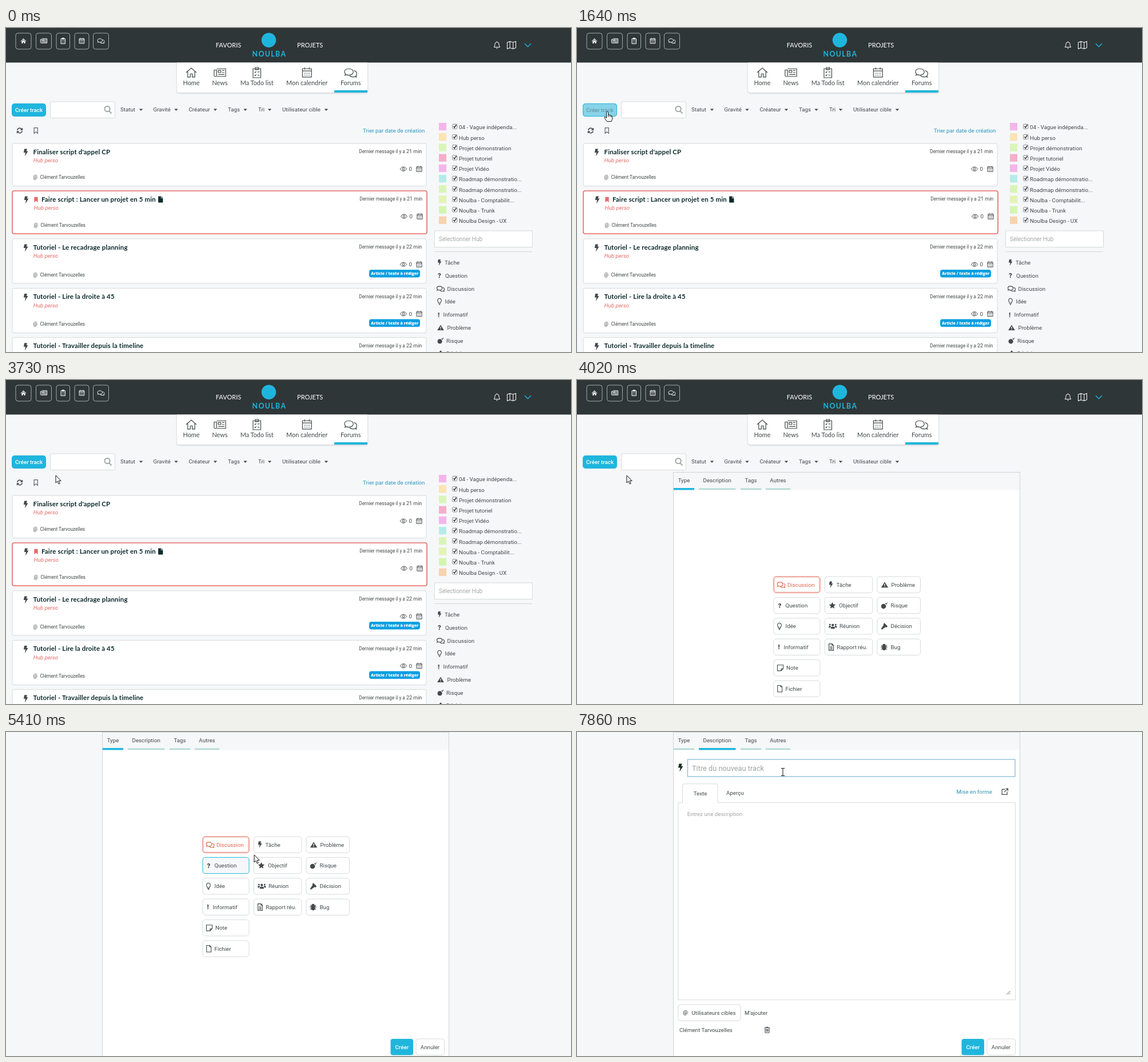
An HTML page that plays this animation: 988x567 px, repeating every 8000 ms.

```html
<!DOCTYPE html>
<html lang="fr">
<head>
<meta charset="utf-8">
<title>Créer un track</title>
<style>
html, body { margin: 0; width: 100%; height: 100%; overflow: hidden; background: #f6f7f9; }
svg { display: block; width: 100vw; height: 100vh; color: #43484b; }
text { font: 9.75px Roboto, sans-serif; fill: currentColor; white-space: pre; }
.l { fill: none; stroke: currentColor; }
.s { fill: currentColor; fill-rule: evenodd; }
.nav { font: 10.9px Lato, sans-serif; }
.top { font: 11px Lato, sans-serif; }
.brand { font: 700 12.3px Lato, sans-serif; letter-spacing: 1.4px; }
.title { font: 700 11.5px Lato, sans-serif; letter-spacing: .14px; }
.hub { font-style: italic; }
.small { font-size: 8.25px; }
.mid { font-size: 9px; }
.bold { font-weight: 500; }
.mark { font: 900 11.5px Roboto, sans-serif; }
.badge { font: 800 6.9px "Open Sans", sans-serif; }
.big { font-size: 12.75px; }
.box { fill: #fff; stroke: #d6dadc; }
.hov .box { fill: #f5f7f9; stroke: #1fb6dd; }
.sel { color: #e0664f; }
.sel .box { fill: #fff; stroke: #e0705f; }
.halo { fill: none; stroke: #e0705f; stroke-width: 3; opacity: 0; }
.sel .halo { opacity: .2; }
</style>
</head>
<body>
<svg id="stage" viewBox="0 0 988 567" preserveAspectRatio="none"></svg>
<script>
const CYAN = '#1fb6dd', RED = '#e66a66', INK = '#0c2a2b', PAGE = '#f6f7f9';
const BRAND = 'Noulba', PERSON = 'Clément Tarvouzelles';
const LOOP = 8000, STEP = 10;

// Icons live in a 16-unit box around 0,0; a leading "*" means filled.
const ICONS = {
  home: 'M-8 0L0-7L8 0M-5.5-2V7H-1.5V2H1.5V7H5.5V-2',
  house: '*M-8 1L0-7L8 1L7 2L0-4L-7 2ZM-5 2L0-2.5L5 2V7H1.5V3H-1.5V7H-5Z',
  news: 'M-5-6H9V6H-7.5Q-9 6-9 4.5V-4H-5V5M-2.5-3.5H1.5V0H-2.5ZM3.5-3.5H7M3.5 0H7M-2.5 3H7',
  todo: 'M-6-6H6V8H-6ZM-2.5-6V-8H2.5V-4.5H-2.5ZM-3.5-1L-2.5 0L-1-2M1-1H4M-3.5 4L-2.5 5L-1 3M1 4H4',
  cal: 'M-7-6H7V7H-7ZM-7-2.5H7M-3.5-8V-5M3.5-8V-5M-4 1h1.6M-.8 1h1.6M2.4 1h1.6M-4 4h1.6M-.8 4h1.6M2.4 4h1.6',
  chat: 'M-3-6C1-6 4-4 4-1S1 4-3 4Q-5 4-6.5 3.2L-9 4.2L-8 2Q-9.5 .5-9.5-1C-9.5-4-7-6-3-6ZM5-3C8-2.5 9.5-.5 9.5 2Q9.5 3.5 8 5L9 7L6.5 6.3Q1 8-2 4.5',
  bell: 'M-6 4Q-4 2-4-2Q-4-6 0-6T4-2Q4 2 6 4ZM-1.5 6Q0 7.5 1.5 6M0-6V-7.5',
  map: 'M-8-5L-3-7L3-5L8-7V5L3 7L-3 5L-8 7ZM-3-7V5M3-5V7',
  down: 'M-8-4L0 4L8-4',
  search: 'M4-1.5a5 5 0 1 1-10 0a5 5 0 1 1 10 0M2.5 2.5L7 7',
  refresh: 'M-6-1A6 6 0 0 1 5-3.5M6 1A6 6 0 0 1-5 3.5M6.5-6.5V-2H2M-6.5 6.5V2H-2',
  flag: 'M-4.5-7H4.5V7L0 3L-4.5 7Z',
  flagOn: '*M-5-7H5V8L0 4L-5 8Z',
  bolt: '*M-3-8H3L1.5-3H5L-2 8L-.5 0H-4.5Z',
  doc: '*M-6-8H1V-3H6V8H-6ZM2-8L6-4H2Z',
  file: 'M-5.5-8H2L5.5-4.5V8H-5.5ZM2-8V-4.5H5.5',
  report: 'M-5.5-8H2L5.5-4.5V8H-5.5ZM2-8V-4.5H5.5M-3-1H3M-3 2H3M-3 5H3',
  eye: 'M-9 0Q-5-6 0-6T9 0Q5 6 0 6T-9 0ZM3 0a3 3 0 1 1-6 0a3 3 0 1 1 6 0',
  bulb: 'M-2.5 4Q-2.5 2-4-.2Q-5-2-4.6-4Q-3.5-8 0-8T4.6-4Q5-2 4-.2Q2.5 2 2.5 4ZM-2 6.5H2M-1 8H1',
  warn: '*M0-7L8.5 7H-8.5ZM-1-2.5V2H1V-2.5ZM-1 3.5V5.3H1V3.5Z',
  bomb: '*M4 2a6 6 0 1 1-12 0a6 6 0 1 1 12 0M2-5L3.5-6.5L6.5-3.5L5-2ZM5.5-6L8-8L7-4.5Z',
  star: '*M0-8L2.4-2.8L8-2.2L3.8 1.7L5 7.3L0 4.4L-5 7.3L-3.8 1.7L-8-2.2L-2.4-2.8Z',
  users: '*M3-3a3 3 0 1 1-6 0a3 3 0 1 1 6 0M-5 6V4Q-5 1-2 1H2Q5 1 5 4V6ZM-5-4a2 2 0 1 1-4 0a2 2 0 1 1 4 0M9-4a2 2 0 1 1-4 0a2 2 0 1 1 4 0M-10 3V1Q-9.5-1-7-1Q-5-1-4 .5Q-6 1.5-6 3ZM10 3V1Q9.5-1 7-1Q5-1 4 .5Q6 1.5 6 3Z',
  gavel: '*M0-8L8 0L5 3L3.5 1.5L-6 8L-8 6L-1.5-3.5L-3-5Z',
  bug: '*M-3-4Q-3-7 0-7T3-4ZM-4-3H4V3Q4 7 0 7T-4 3ZM-4 0H-8M4 0H8M-4-2L-7-5M4-2L7-5M-4 3L-7 6M4 3L7 6',
  note: 'M-7-7H7V2L2 7H-7ZM7 2H2V7',
  trash: 'M-7-5H7M-2.5-5V-7H2.5V-5M-5.5-5V8H5.5V-5M-2.5-2V5M0-2V5M2.5-2V5',
  open: 'M1-6H-7V7H6V0M2-8H8V-2M8-8L-1 1'
};

const text = (x, y, s, attr = '') => `<text x="${x}" y="${y}" ${attr}>${s}</text>`;
const mid = (x, y, s, attr = '') => text(x, y, s, 'text-anchor="middle" ' + attr);
const rect = (x, y, w, h, attr = '') => `<rect x="${x}" y="${y}" width="${w}" height="${h}" ${attr}/>`;
const path = (d, attr = '') => `<path d="${d}" ${attr}/>`;
const group = (attr, ...parts) => `<g ${attr}>${parts.join('')}</g>`;

function icon(name, x, y, size = 12, weight = 1.1, color = '') {
  if (name.length === 1) return mid(x, y + 4, name, 'class="mark"');
  const d = ICONS[name], solid = d[0] === '*', k = size / 16;
  const line = solid ? (name === 'bug' ? 'stroke="currentColor" stroke-width="1.5"' : '') : `stroke-width="${weight / k}"`;
  return path(d.replace('*', ''), `class="${solid ? 's' : 'l'}" ${line} transform="translate(${x} ${y}) scale(${k})" ${color && `color="${color}"`}`);
}

const HUBS = [
  ['04 - Vague indépendante', '#f4b6ea'], ['Hub perso', '#fbe3b4'], ['Projet démonstration', '#d9f5b8'],
  ['Projet tutoriel', '#f3aecb'], ['Projet Vidéo', '#f4b6ea'], ['Roadmap démonstration', '#b5ecea'],
  ['Roadmap démonstration cible', '#d9f5b8'], [BRAND + ' - Comptabilité', '#e3f5b5'],
  [BRAND + ' - Trunk', '#d4f5b0'], [BRAND + ' Design - UX', '#f7d3ae']
];

function header() {
  const keys = [[17, 27, 'house'], [52.5, 27, 'news'], [88, 23.5, 'todo'], [120, 25, 'cal'], [152.5, 27, 'chat']];
  return rect(0, 0, 988, 60.5, 'fill="#2f3638"') + group('color="#fff"',
    ...keys.map(([x, w, name]) => rect(x, 9, w, 28, 'rx="4" fill="none" stroke="#a3a9ab"') + icon(name, x + w / 2, 22.5, 10, 1)),
    mid(389, 34, 'FAVORIS', 'class="top"'), mid(531.7, 34, 'PROJETS', 'class="top"'),
    `<circle cx="459.5" cy="21.3" r="12.7" fill="${CYAN}"/>`,
    mid(460.5, 49.5, BRAND.toUpperCase(), `class="brand" color="${CYAN}"`),
    icon('bell', 858.5, 30, 14, 1), icon('map', 884, 30, 15, 1), icon('down', 912.5, 30, 11, 1.3, CYAN));
}

function navBar() {
  const items = [[324, 'home', 'Home'], [374, 'news', 'News'], [438.7, 'todo', 'Ma Todo list'], [526.3, 'cal', 'Mon calendrier'], [602.7, 'chat', 'Forums']];
  return path('M299 60.5H632V109Q632 113 628 113H303Q299 113 299 109Z', 'fill="#fff" style="filter:drop-shadow(0 1px 1.5px #0003)"')
    + items.map(([x, name, label]) => icon(name, x, 78, 18, 1.2) + mid(x, 99.5, label, 'class="nav"')).join('')
    + rect(574, 109, 58, 4, `fill="${CYAN}"`);
}

function toolbar() {
  const filters = [[200, 236, 'Statut'], [257.5, 297.5, 'Gravité'], [319.5, 366, 'Créateur'], [388, 418.5, 'Tags'], [441, 461, 'Tri'], [483, 560, 'Utilisateur cible']];
  return rect(10, 132, 60, 23, `rx="5" fill="${CYAN}"`)
    + mid(40, 146.5, 'Créer track', 'class="bold" color="#fff"')
    + group('id="press" opacity="0"', rect(10.5, 132.5, 59, 22, `rx="5" fill="#87d3e8" stroke="${CYAN}"`),
      mid(40, 146.5, 'Créer track', 'color="#5c8a97"'))
    + rect(77.5, 129, 113, 28.5, 'class="box" rx="2"') + icon('search', 178, 143, 15, 2, '#a2a6a8')
    + filters.map(([x, cx, s]) => text(x, 146.3, s) + path(`M${cx - 3.2} 141.5h6.4l-3.2 3.4z`, 'fill="#43484b"')).join('')
    + icon('refresh', 24, 179.5, 11, 1.5) + icon('flag', 52.2, 179.5, 11, 1)
    + text(624, 182.7, 'Trier par date de création', 'color="#2795bf"');
}

function card(y, h, title, age, { alert, badge } = {}) {
  const x = alert ? 1 : 0, foot = y + h - 15;
  return rect(11, y, 724 + x, h, `class="box" rx="3" ${alert ? `style="stroke:${RED};stroke-width:1.6"` : ''}`)
    + icon('bolt', 34.5 + x, y + 16, 13)
    + (alert ? icon('flagOn', 52.5, y + 15, 10, 1, RED) + icon('doc', 270.3, y + 15, 11, 1, INK) : '')
    + text(alert ? 62 : 47.5, y + 18.6, title, `class="title" color="${INK}"`)
    + text(47.8 + x, y + 33, 'Hub perso', `class="hub" color="${RED}"`)
    + text(47.5 + x, foot + 2.5, '@', 'class="small"') + text(59.5 + x, foot + 2.5, PERSON, 'class="small"')
    + text(727.3 + x, y + 17.2, `Dernier message il y a <tspan class="mid">${age} min</tspan>`, 'class="small" text-anchor="end"')
    + icon('eye', 695 + x, y + 44.7, 10, 1) + text(704.5 + x, y + 48.3, '0') + icon('cal', 722.5 + x, y + 44.7, 10.5, 1)
    + (badge ? rect(635, y + 54, 89, 13.5, 'rx="4" fill="#0d9fe0"')
      + mid(679.7, y + 63.2, 'Article / texte à rédiger', 'class="badge" color="#fff"') : '');
}

function sidebar() {
  const kinds = [['bolt', 767, 'Tâche'], ['?', 768, 'Question'], ['chat', 771.5, 'Discussion'], ['bulb', 767.5, 'Idée'],
    ['!', 764.5, 'Informatif'], ['warn', 771.5, 'Problème'], ['bomb', 770, 'Risque'], ['gavel', 770, 'Décision']];
  return HUBS.map(([name, color], i) => {
    const y = 172.7 + i * 18.2;
    return rect(757, y - 6.7, 13, 13.2, `fill="${color}"`)
      + rect(780.7, y - 4.4, 8, 8, 'rx="1" fill="#fff" stroke="#888"')
      + path(`M782.5 ${y - .7}l1.8 2.3l3.2-5`, 'class="l" stroke-width="1.7"')
      + text(792, y + 4.6, name.length > 20 ? name.slice(0, 20) + '...' : name);
  }).join('')
    + rect(749.5, 355, 171, 28.5, 'class="box"') + text(757, 373, 'Sélectionner Hub', 'color="#a3a6a8" style="font-size:10px"')
    + path('M750 391.5H920', 'stroke="#d3d7d9"')
    + kinds.map(([name, x, s], i) => {
      const y = 410.5 + i * 22.75;
      return icon(name, x > 769 ? 760 : x > 765 ? 758 : 756.5, y, 11) + text(x, y + 3.5, s);
    }).join('');
}

function menu() {
  return group('id="menu" opacity="0"',
    rect(10.5, 132.5, 157, 219.5, 'fill="#fff" stroke="#d3d7d9" style="filter:drop-shadow(0 3px 3px #0004)"'),
    rect(11, 0, 156, 21.5, 'id="hover" fill="#f5f7f9"'),
    ...HUBS.map(([name, color], i) => {
      const y = 143 + i * 22;
      return rect(16, y - 4, 8, 8, `fill="${i === 3 ? '#f5b8b8' : color}"`) + text(30, y + 3.3, name)
        + (i < 9 ? path(`M11 ${y + 11.5}H167`, 'stroke="#dcdfe1"') : '');
    }),
    path('M11 0H168', `id="hoverLine" stroke="${CYAN}" stroke-width="1.3"`));
}

function choices() {
  const cols = [
    [344, 81, ['chat', 357, 368, 'Discussion'], ['?', 354.5, 364.5, 'Question'], ['bulb', 354, 364.5, 'Idée'],
      ['!', 353, 361.5, 'Informatif'], ['note', 355.5, 366, 'Note'], ['file', 354.7, 364.5, 'Fichier']],
    [433.3, 83.5, ['bolt', 444, 453.5, 'Tâche'], ['star', 446.5, 458, 'Objectif'], ['users', 447.3, 459, 'Réunion'], ['report', 444.5, 454.3, 'Rapport réu.']],
    [525, 75.5, ['warn', 538, 549.5, 'Problème'], ['bomb', 537.5, 548.5, 'Risque'], ['gavel', 537.5, 548.5, 'Décision'], ['bug', 537, 548.5, 'Bug']]
  ];
  return cols.map(([x, w, ...items]) => items.map(([name, ix, tx, s], i) => {
    const y = 183 + i * 36.4;
    return group(`id="${s}"`, rect(x, y, w, 28.3, 'class="box" rx="4.5"'), rect(x + 1, y + 1, w - 2, 26.3, 'class="halo" rx="4"'),
      icon(name, ix, y + 14.2, 11.5), text(tx, y + 17.5, s));
  }).join('')).join('');
}

function details() {
  return icon('bolt', 181, 62.5, 14, 1, '#1d2a22')
    + rect(193.5, 48, 572.5, 30, 'fill="#fff" stroke="#85bfdc" stroke-width="1.3"')
    + text(201, 67.5, 'Titre du nouveau track', 'class="big" color="#a0a3a5"')
    + rect(201, 55, 1, 16, 'id="caret" fill="#222"')
    + rect(177, 123.7, 589.5, 345, 'class="box"')
    + path('M184.5 124.3V93.5Q184.5 90.7 187.5 90.7H243Q246 90.7 246 93.5V124.3', 'fill="#fff" stroke="#d6dadc"')
    + mid(215.5, 110.8, 'Texte') + text(261, 110.3, 'Aperçu')
    + text(663.5, 107.8, 'Mise en forme', 'color="#2b96b0"') + icon('open', 748, 104.5, 11, 1.2)
    + text(192.7, 147.3, 'Entrez une description', 'color="#a0a3a5"')
    + path('M751 459.5l6.5-6.5M754.5 459.5l3-3', 'class="l" stroke-width=".8"')
    + rect(177, 477, 109, 28.5, 'class="box" rx="4"') + mid(189.7, 494.3, '@', 'class="bold"')
    + text(200.5, 494.5, 'Utilisateurs cibles') + text(293, 494.5, "M'ajouter")
    + text(179, 524.6, PERSON) + icon('trash', 332.5, 521, 10.5, 1);
}

function panel() {
  const tabs = [[169, 36, 187, 'Type'], [213, 64.5, 245.2, 'Description'], [286, 36.5, 304, 'Tags'], [330, 43, 351.5, 'Autres']];
  return group('id="panel"', rect(0, 0, 988, 567, `fill="${PAGE}"`),
    rect(168.5, .5, 606, 600, 'fill="#fff" stroke="#d0d4d6"'), rect(169, 1, 605, 30.5, 'fill="#f5f7f8"'),
    ...tabs.map(([x, w, cx, s], i) => rect(x, 28.7, w, 2.2, 'fill="#add6d2"') + mid(cx, 18.2, s)
      + (i < 2 ? rect(x, 28, w, 3.5, `id="tab${i}" fill="${CYAN}"`) : '')),
    group('id="choices"', choices()), group('id="details"', details()),
    rect(672.5, 537, 39.5, 28.5, `rx="4" fill="${CYAN}"`), mid(692.3, 554.6, 'Créer', 'class="bold" color="#fff"'),
    rect(717, 537, 49.5, 28.5, 'class="box" rx="4"'), mid(741.5, 554.6, 'Annuler'));
}

const POINTERS = {
  arrow: path('M0 0V13L3 10.2L5.2 15L7.3 14L5.1 9.4H9.2Z', 'id="arrow" fill="#fff" stroke="#111"'),
  hand: path('M-1.5 1.5Q0-1 1.5 1.5V6Q3.5 5 4.2 6.6Q6 6 6.6 7.6Q8.7 7.2 8.7 9.5V12Q8.7 14.5 7.3 17.5H-.5L-4.8 11.5Q-5.5 9.5-3.8 9.7L-1.5 11.5ZM1.5 6V9.5M4.2 6.6V9.5M6.6 7.6V10', 'id="hand" fill="#fff" stroke="#111"'),
  beam: path('M-3-6.5H-1L0-5.8L1-6.5H3M0-6V6M-3 6.5H-1L0 5.8L1 6.5H3', 'id="beam" fill="none" stroke="#111"')
};

const stage = document.getElementById('stage');
stage.innerHTML = [
  header(), navBar(), toolbar(),
  card(202, 74.5, "Finaliser script d'appel CP", 21),
  card(285, 75, 'Faire script : Lancer un projet en 5 min', 21, { alert: true }),
  card(369, 78, 'Tutoriel - Le recadrage planning', 22, { badge: true }),
  card(455.5, 78, 'Tutoriel - Lire la droite à 45', 22, { badge: true }),
  card(541.7, 78, 'Tutoriel - Travailler depuis la timeline', 22),
  sidebar(), menu(), panel(), group('id="pointer"', ...Object.values(POINTERS))
].join('');

const el = id => document.getElementById(id);
const set = (id, name, value) => el(id).setAttribute(name, value);
const show = (id, on) => { el(id).style.display = on ? '' : 'none'; };
const during = (t, a, b) => t >= a && t < b;
const ramp = (t, a, b) => Math.min(1, Math.max(0, (t - a) / (b - a)));

// Pointer path: time, x, y
const TRACK = [
  [270, 884, 567], [1060, 53, 146], [2190, 53, 146], [2530, 74, 160], [2720, 74, 160], [2870, 87, 167],
  [4480, 87, 167], [4530, 89, 173], [4730, 89, 173], [4780, 95, 176], [5020, 95, 176], [5200, 235, 212],
  [5330, 392, 228], [5410, 434, 215], [5560, 460, 203], [5750, 468, 201], [6420, 468, 201], [6640, 400, 120],
  [6830, 366, 77], [6880, 364, 70], [7040, 364, 70], [7090, 353, 66], [7150, 360, 69.5]
];

// Slope is zero wherever the pointer rests.
function slope(i, axis) {
  const a = TRACK[i - 1], b = TRACK[i], c = TRACK[i + 1];
  const rests = !a || !c || [a, c].some(p => p[1] === b[1] && p[2] === b[2]);
  return rests ? 0 : (c[axis] - a[axis]) / (c[0] - a[0]);
}

function pointerAt(t) {
  const next = TRACK.findIndex(p => p[0] > t);
  if (next < 1) return TRACK[next < 0 ? TRACK.length - 1 : 0].slice(1);
  const a = TRACK[next - 1], b = TRACK[next], span = b[0] - a[0], u = (t - a[0]) / span;
  return [1, 2].map(k => {
    const bend = u * (1 - u) * span * (slope(next - 1, k) * (1 - u) - slope(next, k) * u);
    return a[k] + (b[k] - a[k]) * u * u * (3 - 2 * u) + bend;
  });
}

function pointerKind(t) {
  if (t >= 6340) return 'beam';
  return during(t, 1030, 3480) || during(t, 5295, 5405) || during(t, 5450, 6340) ? 'hand' : 'arrow';
}

function mark(id, selected, hovered) {
  el(id).setAttribute('class', selected ? 'sel' : hovered ? 'hov' : '');
}

function draw(t) {
  const [x, y] = pointerAt(t), kind = pointerKind(t);
  show('pointer', t >= 270);
  set('pointer', 'transform', `translate(${Math.round(x)} ${Math.round(y)})`);
  for (const name in POINTERS) show(name, name === kind);

  set('press', 'opacity', t < 2100 ? ramp(t, 1060, 1240) : 0);
  set('menu', 'opacity', ramp(t, 1680, 1930) * (1 - ramp(t, 3380, 3520)));
  const row = y > 154 ? 1 : 0;
  set('hover', 'y', 133 + row * 22);
  set('hoverLine', 'transform', `translate(0 ${155 + row * 22})`);

  const left = (1 - ramp(t, 3928, 4269)) ** 4;
  show('panel', t >= 3928);
  set('panel', 'transform', `translate(0 ${Math.round(567 * left * 2) / 2})`);

  const written = t >= 6340;
  show('choices', !written);
  show('details', written);
  show('tab0', !written);
  show('tab1', written);
  mark('Discussion', t < 6030);
  mark('Question', false, during(t, 5290, 5440));
  mark('Tâche', t >= 6030, t >= 5450);
  show('caret', during(t, 6340, 6830) || during(t, 7350, 7860));
}

// The clock ticks in steps of 10 ms.
function tick() {
  draw(Math.round(performance.now() / STEP) * STEP % LOOP);
  requestAnimationFrame(tick);
}
tick();
</script>
</body>
</html>
```
